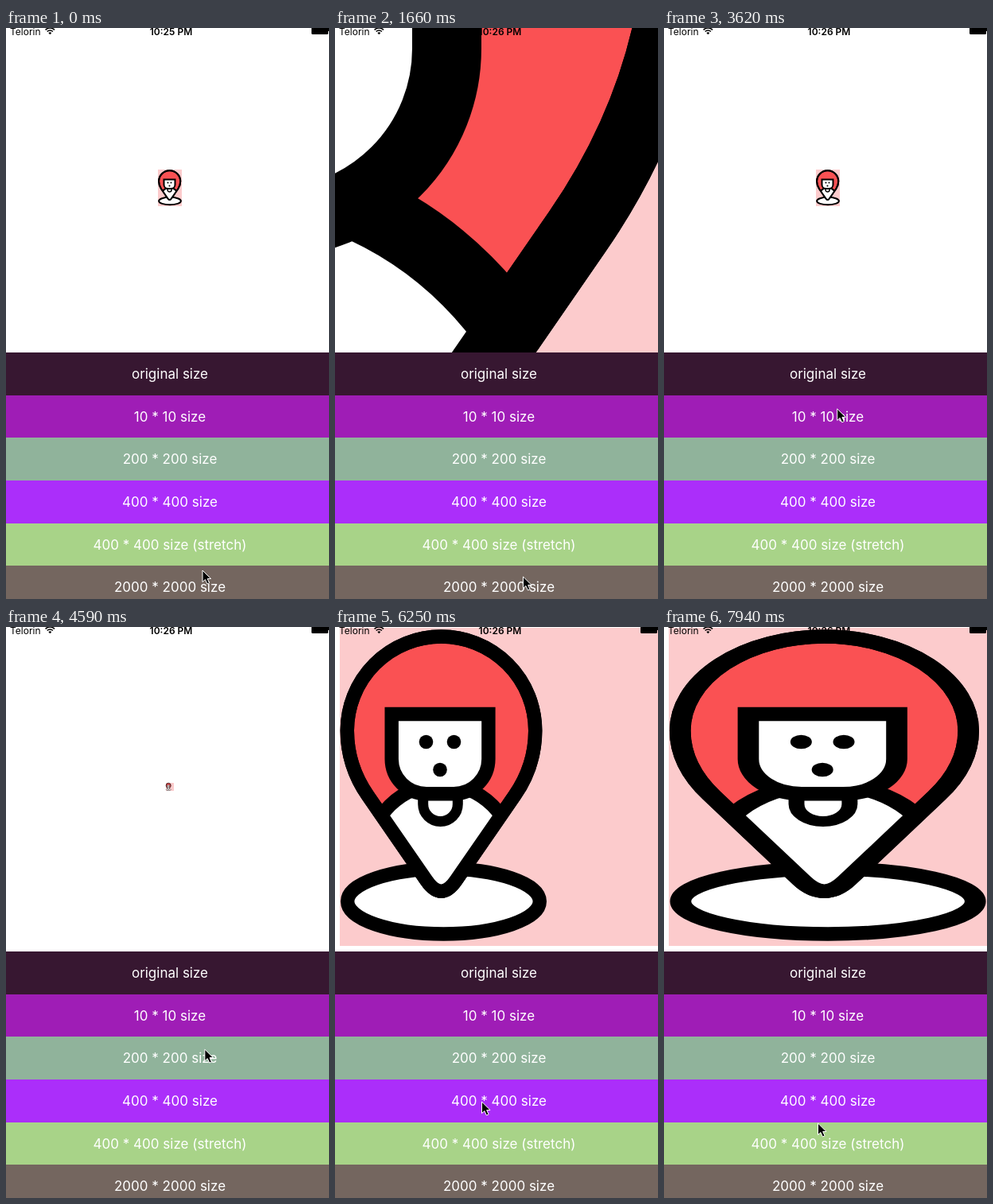
These frames come from a looping animation (406x718 px, 8 s). An HTML page:

```html
<!DOCTYPE html>
<html lang="en">
<head>
<meta charset="utf-8">
<title>Image sizes</title>
<style>
html, body { margin: 0; width: 100%; height: 100%; overflow: hidden; background: #fff; }
svg { display: block; width: 100vw; height: 100vh; }
text { font-family: Inter, "Liberation Sans", sans-serif; }
#rows { font-variant-ligatures: no-contextual; }
</style>
</head>
<body>
<svg viewBox="0 0 406 718">
  <defs>
    <path id="pin" d="M127.5 11A118.2 118.2 0 0 1 245.7 129.2C245.7 161 235.7 187.9 219.8 210.9L146 317.8Q127.5 344.6 109 317.8L35.2 210.9C19.3 187.9 9.3 161 9.3 129.2A118.2 118.2 0 0 1 127.5 11Z"/>
    <clipPath id="inPin"><use href="#pin"/></clipPath>
  </defs>

  <rect id="box" fill="#fccbcc"/>
  <g id="icon" fill="#fff" stroke="#000" stroke-width="17.4">
    <ellipse cx="130.5" cy="344" rx="120.8" ry="41"/>
    <use href="#pin" fill="#fa5153"/>
    <g clip-path="url(#inPin)"><circle cx="127.5" cy="288" r="91.3"/></g>
    <use href="#pin" fill="none"/>
    <path d="M104.7 208V221.7A21.8 21.8 0 0 0 148.3 221.7V208" stroke-width="13"/>
    <path d="M65.2 108.5H186.9V165A43.7 43.7 0 0 1 143.2 208.7H108.9A43.7 43.7 0 0 1 65.2 165Z"/>
    <g fill="#000" stroke="none">
      <circle cx="108.5" cy="143.5" r="8.8"/>
      <circle cx="143.5" cy="143.5" r="8.8"/>
      <circle cx="126" cy="178.5" r="8.8"/>
    </g>
  </g>

  <g font-size="12">
    <text x="5" y="9">Telorin</text>
    <text id="clock" x="207.5" y="9" text-anchor="middle" font-weight="600"></text>
    <path d="M55.3 8.2L53.3 6.1A2.9 2.9 0 0 1 57.3 6.1Z"/>
    <path d="M51.7 4.5A5.1 5.1 0 0 1 58.9 4.5M49.6 2.4A8 8 0 0 1 61 2.4" fill="none" stroke="#000" stroke-width="1.6"/>
    <rect x="384" y="-3" width="21" height="11" rx="1.5"/>
    <rect x="404" y="0" width="2" height="4"/>
  </g>

  <g id="rows" font-size="17" text-anchor="middle"></g>

  <circle id="press" r="9.6" fill="none" stroke="#111" stroke-width="1.2"/>
  <path id="cursor" d="M0 0V14.6L3.4 11.5L5.9 17L8.6 15.8L6.2 10.5H10.6Z" stroke="#fff" stroke-width="1" stroke-linejoin="round"/>
</svg>
<script>
const LOOP = 8000, NATURAL_W = 260.9, MID_X = 206, MID_Y = 201;
const ROW_TOP = 408, ROW_H = 53.65;
const STEP = 88, HOLD = 180;
const $ = id => document.getElementById(id);
const set = (el, attrs) => { for (const k in attrs) el.setAttribute(k, attrs[k]); };

function add(parent, tag, attrs, text = '') {
  const el = document.createElementNS('http://www.w3.org/2000/svg', tag);
  set(el, attrs);
  el.textContent = text;
  parent.append(el);
}

const rows = [
  ['original size', '#371731'],
  ['10 * 10 size', '#9f1db6'],
  ['200 * 200 size', '#90b39b'],
  ['400 * 400 size', '#ab2efa'],
  ['400 * 400 size (stretch)', '#a8d388'],
  ['2000 * 2000 size', '#74665f']
];
const edge = i => Math.round(ROW_TOP + i * ROW_H);
rows.forEach(([label, fill], i) => {
  add($('rows'), 'rect', { x: 0, y: edge(i), width: 406, height: edge(i + 1) - edge(i), fill });
  add($('rows'), 'text', { x: 206, y: ROW_TOP + 33 + i * ROW_H, fill: '#fff' }, label);
});

// Each tap: the pointer travels from its last place past `via` to `to`,
// is pressed, and the view follows `lag` ms after the release.
const natural = { w: 30, h: 46 };
const square = w => ({ w, h: w });
const taps = [
  { go: 150, steps: 1, via: [240, 686], to: [236.5, 690], press: 1210, lag: 270, view: square(2000) },
  { go: 2560, steps: 7, via: [265, 560], to: [233.5, 425], press: 3180, lag: 170, view: natural },
  { go: 3360, steps: 7, via: [227, 461], to: [206.5, 505], press: 4060, lag: 0, view: square(10) },
  { go: 4240, steps: 7, via: [248, 503], to: [252.5, 544], press: 4930, lag: 0, view: square(200) },
  { go: 5280, steps: 8, via: [310, 613], to: [184.5, 597], press: 6070, lag: 0, view: square(400) },
  { go: 6600, steps: 6, via: [178, 620], to: [166.5, 650], press: 7400, lag: 90, view: { ...square(400), stretch: true } },
  { go: 7850, steps: 2, via: [180, 637], to: [193.5, 624] }
];

const bend = (a, b, c, s) => (1 - s) ** 2 * a + 2 * s * (1 - s) * b + s * s * c;

// The pointer advances in discrete steps that slow down towards the end.
function stateAt(t) {
  let at = [247, 682], view = natural, down = false;
  for (const { go, steps, via, to, press, lag, view: next } of taps) {
    if (t < go) break;
    const step = Math.min(steps, Math.floor((t - go) / STEP + 0.15) + 1);
    const s = 1 - (1 - step / steps) ** 1.4;
    at = at.map((a, i) => bend(a, via[i], to[i], s));
    down = t >= press && t < press + HOLD;
    if (t >= press + HOLD + lag) view = next;
    else if (press && t < press + HOLD + lag) continue;
  }
  return { at, view, down };
}

function draw(t) {
  const { at: [px, py], view: { w, h, stretch }, down } = stateAt(t);
  const x = MID_X - w / 2, y = MID_Y - h / 2, sy = h / 400;
  const sx = stretch ? w / NATURAL_W : sy;
  set($('box'), { x, y, width: w, height: h });
  set($('icon'), { transform: `translate(${x} ${y}) scale(${sx} ${sy})` });
  $('clock').textContent = t < 1660 ? '10:25 PM' : '10:26 PM';
  set($('cursor'), { transform: `translate(${px} ${py})` });
  set($('press'), { cx: px + 2, cy: py + 0.5, visibility: down ? 'visible' : 'hidden' });
}

const start = performance.now();
function tick() {
  draw((performance.now() - start) % LOOP);
  requestAnimationFrame(tick);
}
tick();
</script>
</body>
</html>
```
